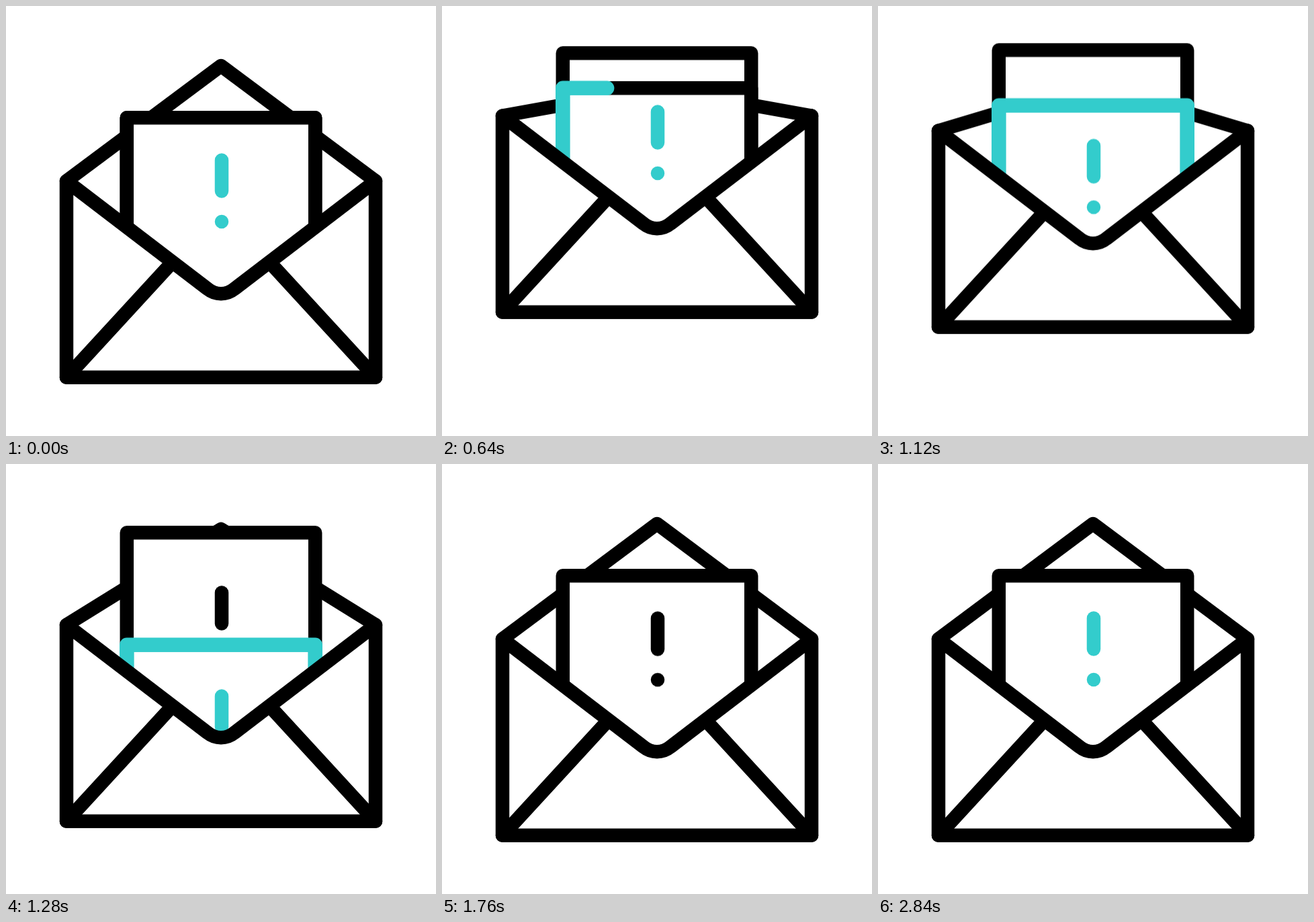
An HTML page that plays this animation: 640 px wide and 640 px high, repeating every 3 s.

```html
<!DOCTYPE html>
<html lang="en">
<head>
<meta charset="utf-8">
<title>Mail alert</title>
<style>
  html, body { margin: 0; width: 100%; height: 100%; overflow: hidden; background: #fff; }
  svg { display: block; width: 100%; height: 100%; }

  .line { fill: none; stroke: #000; stroke-width: 20.5; stroke-linecap: round; stroke-linejoin: round; }
  .paper { fill: #fff; }
  .teal { stroke: #33cccc; }
  .wide { stroke-width: 21.6; }
  .trim { stroke-dasharray: 1 2; stroke-dashoffset: 1.01; }

  .move { animation: 3s cubic-bezier(.45, 0, .5, 1) infinite; }
  .envelope { animation-name: envelope; }
  .flap { animation-name: flap; }
  .back { animation-name: back; }
  .front { animation-name: front; }
  .front-mark { animation-name: front-mark; }
  .back-mark { animation-name: back-mark; }
  .edge { animation-name: edge; }
  .base { animation-name: base; }
  .bar { animation-name: bar; }
  .dot { animation-name: dot; }

  @keyframes envelope {
    0%, 5.63% { transform: translateY(0); }
    23.93% { transform: translateY(-100px); }
    32% { transform: translateY(-100px); animation-timing-function: cubic-bezier(.4, 0, .15, 1); }
    53.87%, 100% { transform: translateY(0); }
  }
  /* The flap folds down relative to the envelope */
  @keyframes flap {
    0%, 7.23% { d: path("M90 260.5 L320 89 L550 260.5"); }
    24.47% { d: path("M90 260.5 L320 226 L550 260.5"); }
    32% { d: path("M90 260.5 L320 226 L550 260.5"); animation-timing-function: cubic-bezier(.4, 0, .15, 1); }
    53.87%, 100% { d: path("M90 260.5 L320 89 L550 260.5"); }
  }
  @keyframes back {
    0%, 7.63% { transform: translateY(0); }
    25.33%, 34.67% { transform: translateY(-104.5px); }
    53.73%, 100% { transform: translateY(0); }
  }
  @keyframes front {
    0%, 7.63% { transform: translateY(0); }
    25.33% { transform: translateY(-48px); }
    32.33% { transform: translateY(-48px); animation-timing-function: cubic-bezier(.5, 0, .5, 1); }
    53.87%, 100% { transform: translateY(278px); }
  }
  @keyframes front-mark {
    0%, 6.4% { transform: translateY(0); }
    23.63% { transform: translateY(-74px); }
    30.6% { transform: translateY(-74px); animation-timing-function: cubic-bezier(.5, 0, .5, 1); }
    53.87%, 100% { transform: translateY(278px); }
  }
  @keyframes back-mark {
    0%, 47.67% { transform: translateY(26px); }
    70.67%, 74.67% { transform: translateY(-26px); }
    94.67%, 100% { transform: translateY(0); }
  }
  @keyframes edge {
    0%, 13.83% { stroke-dashoffset: 1.01; }
    31.17%, 100% { stroke-dashoffset: 0; }
  }
  @keyframes bar {
    0%, 71.33% { stroke-dashoffset: 1.01; }
    85.33%, 100% { stroke-dashoffset: 0; }
  }
  /* Drop the black bar once the teal one covers it */
  @keyframes base {
    0%, 85.33% { opacity: 1; }
    85.34%, 100% { opacity: 0; }
  }
  @keyframes dot {
    0%, 71.33% { stroke: #000; }
    85.33%, 100% { stroke: #33cccc; }
  }
</style>
</head>
<body>
<svg viewBox="0 0 640 640">
  <defs>
    <clipPath id="inside"><rect width="640" height="440"/></clipPath>
    <path id="card" d="M179.8 420 V166.3 H460.2 V420"/>
  </defs>

  <g class="move envelope">
    <path class="line move flap" d="M90 260.5 L320 89 L550 260.5"/>
  </g>

  <g class="move back">
    <use href="#card" class="line paper"/>
    <g class="move back-mark">
      <path class="line move base" d="M321 229.4 V275.5"/>
      <path class="line teal trim move bar" pathLength="1" d="M321 229.4 V275.5"/>
      <path class="line move dot" d="M321 321 h.01"/>
    </g>
  </g>

  <g clip-path="url(#inside)">
    <g class="move front">
      <use href="#card" class="line paper"/>
      <path class="line teal wide trim move edge" pathLength="1" d="M179.8 420 V166.3 H460.2 V420"/>
    </g>
    <g class="move front-mark">
      <path class="line teal" d="M321 229.4 V275.5 M321 321 h.01"/>
    </g>
  </g>

  <g class="move envelope">
    <path class="line paper" d="M90 260.5 L300 421 C312 430.6 328 430.6 340 421 L550 260.5 V552.7 H90 Z"/>
    <path class="line" d="M90 552.7 L247 382 M550 552.7 L393 382"/>
  </g>
</svg>
</body>
</html>
```
